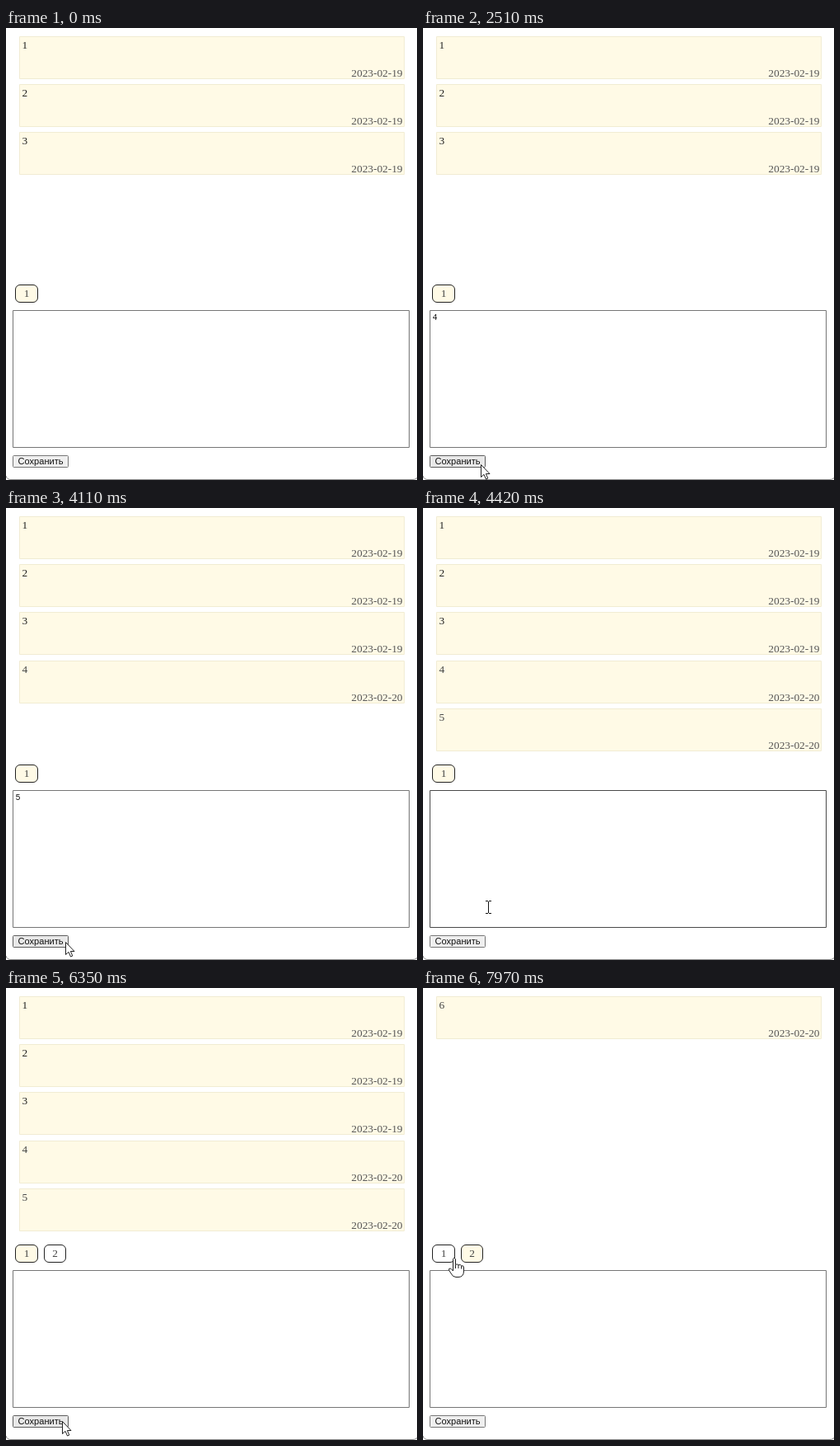
An HTML page with a canvas for the animation above (8 s loop, 499 px wide and 548 px high).

```html
<!DOCTYPE html>
<html lang="ru">
<head>
<meta charset="utf-8">
<title>Заметки</title>
<style>
html, body { margin: 0; width: 100%; height: 100%; overflow: hidden; background: #fff; }
canvas { display: block; width: 499px; height: 548px; }
</style>
</head>
<body>
<canvas id="stage" width="499" height="548"></canvas>
<script>
const LOOP = 8000;
const ctx = document.getElementById('stage').getContext('2d');
const SERIF = '13.33px "Liberation Serif", "Times New Roman", serif';
const SANS = '11.1px "Liberation Sans", Arial, sans-serif';
const MONO = '10px "Liberation Mono", "Courier New", monospace';
const CREAM = '#fffae6';

// Pointer waypoints: time, x, y
const path = [
  [210, 396, 562], [780, 332, 442],
  [1480, 332, 442], [2050, 70, 529],
  [2760, 70, 529], [3050, 109, 409],
  [3620, 109, 409], [3940, 72, 526],
  [4270, 72, 526], [4420, 79, 484], [4660, 104, 412],
  [5340, 104, 412], [5960, 68, 525],
  [6480, 68, 525], [6870, 63, 322], [6930, 62, 321],
  [7760, 62, 321], [7970, 37.5, 327]
];

// One entry per note: focus, typing, button press, note saved
const entries = [
  { focus: 890, type: 1360, press: 2380, save: 2590, text: '4' },
  { focus: 3090, type: 3550, press: 4110, save: 4270, text: '5' },
  { focus: 4710, type: 5220, press: 6090, save: 6220, text: '6' }
];
const PAGE_SWITCH = 7220;

const smooth = k => k * k * (3 - 2 * k);

function pointerAt(t) {
  if (t < path[0][0]) return null;
  const i = path.findIndex(p => p[0] > t);
  if (i < 0) {
    const last = path[path.length - 1];
    return { x: last[1], y: last[2] };
  }
  const [t0, x0, y0] = path[i - 1], [t1, x1, y1] = path[i];
  const k = smooth((t - t0) / (t1 - t0));
  return { x: x0 + (x1 - x0) * k, y: y0 + (y1 - y0) * k };
}

function inside(p, x, y, w, h) {
  return p && p.x >= x && p.x < x + w && p.y >= y && p.y < y + h;
}

function box(x, y, w, h, r, fill, stroke, line = 1) {
  ctx.beginPath();
  ctx.roundRect(x + line / 2, y + line / 2, w - line, h - line, r);
  ctx.fillStyle = fill;
  ctx.fill();
  ctx.lineWidth = line;
  ctx.strokeStyle = stroke;
  ctx.stroke();
}

function label(text, x, y, font, color, align = 'left') {
  ctx.font = font;
  ctx.fillStyle = color;
  ctx.textAlign = align;
  ctx.fillText(text, x, y);
}

function note(n, row) {
  const y = Math.floor(10 + row * 58.34);
  box(16, y, 468, 52, 0, CREAM, '#f1ecd3');
  label(String(n), 19.5, y + 15, SERIF, n < 4 ? '#222' : '#444');
  label(n < 4 ? '2023-02-19' : '2023-02-20', 481.5, y + 49, SERIF, '#555', 'right');
}

function pageButton(n, x, w, active) {
  box(x, 311, w, 22, 5.5, active ? CREAM : '#fff', '#222');
  label(String(n), x + w / 2, 326, SERIF, '#444', 'center');
}

function windowFrame() {
  ctx.strokeStyle = '#8a8a8a';
  ctx.lineWidth = 1;
  ctx.beginPath();
  ctx.moveTo(0, 543);
  ctx.quadraticCurveTo(1, 547.5, 6, 547.5);
  ctx.lineTo(494, 547.5);
  ctx.quadraticCurveTo(497, 547.5, 499, 545.5);
  ctx.stroke();
}

function shape(d, x, y) {
  const p = new Path2D(d);
  ctx.save();
  ctx.translate(Math.round(x), Math.round(y));
  ctx.lineJoin = 'round';
  ctx.lineWidth = 1;
  ctx.fillStyle = '#fff';
  ctx.strokeStyle = '#222';
  ctx.fill(p);
  ctx.stroke(p);
  ctx.restore();
}

function arrow(x, y) {
  shape('M.5 .5V15.5L4 12.3 6.5 18 8.8 17 6.4 11.5H11Z', x, y);
}

function hand(x, y) {
  shape('M-1.5 1.5Q0-1.5 1.5 1.5V8.5Q4 7 5 9Q7.5 7.5 8.5 9.8Q11.5 9 11.5 12' +
    'V17Q11 23.5 5 23.5H2Q-2 23.5-4 19L-6.5 15Q-7 12.5-4.5 13L-1.5 16Z' +
    'M1.5 9V13M5 9V13M8.5 9.8V13.5', x, y);
}

function beam(x, y) {
  x = Math.round(x);
  y = Math.round(y);
  ctx.fillStyle = '#111';
  ctx.fillRect(x, y - 7, 1, 14);
  for (const dy of [-8, 7]) {
    ctx.fillRect(x - 3, y + dy, 3, 1);
    ctx.fillRect(x + 1, y + dy, 3, 1);
  }
}

function editor(t, pointer) {
  const e = entries.find(e => t >= e.focus && t < e.save);
  const focused = e && t < e.press;
  const typed = e && t >= e.type;
  const hover = inside(pointer, 8, 342, 482, 167);
  if (focused) box(8, 342, 482, 167, 1, '#fff', '#101010', 2);
  else box(8, 342, 482, 167, 0, '#fff', hover ? '#4a4a4a' : '#767676');
  if (typed) label(e.text, 11.5, 354, MONO, '#111');
  if (focused) {
    const since = t - (typed ? e.type : e.focus);
    if (since % 1060 < 530) {
      ctx.fillStyle = '#111';
      ctx.fillRect(typed ? 18 : 11, 345, 1, 12);
    }
  }
}

function saveButton(t, pointer) {
  const hover = inside(pointer, 8, 515, 70, 18);
  box(8, 518, 68, 15, 1, hover ? '#e8e8e8' : '#efefef', hover ? '#5c5c5c' : '#767676');
  label('Сохранить', 42, 529, SANS, '#111', 'center');
}

function draw(t) {
  ctx.fillStyle = '#fff';
  ctx.fillRect(0, 0, 499, 548);
  windowFrame();

  const pointer = pointerAt(t);
  const second = t >= PAGE_SWITCH;
  if (second) note(6, 0);
  else {
    const count = Math.min(5, 3 + entries.filter(e => t >= e.save).length);
    for (let i = 0; i < count; i++) note(i + 1, i);
  }
  pageButton(1, 11, 28, !second);
  if (t >= entries[2].save) pageButton(2, 46, 27, second);
  editor(t, pointer);
  saveButton(t, pointer);

  if (!pointer) return;
  const { x, y } = pointer;
  if (inside(pointer, 8, 342, 482, 167)) beam(x, y);
  else if (t > 6480 && inside(pointer, 8, 311, 65, 22)) hand(x, y);
  else arrow(x, y);
}

function tick(now) {
  draw(now % LOOP);
  requestAnimationFrame(tick);
}
draw(0);
requestAnimationFrame(tick);
</script>
</body>
</html>
```
